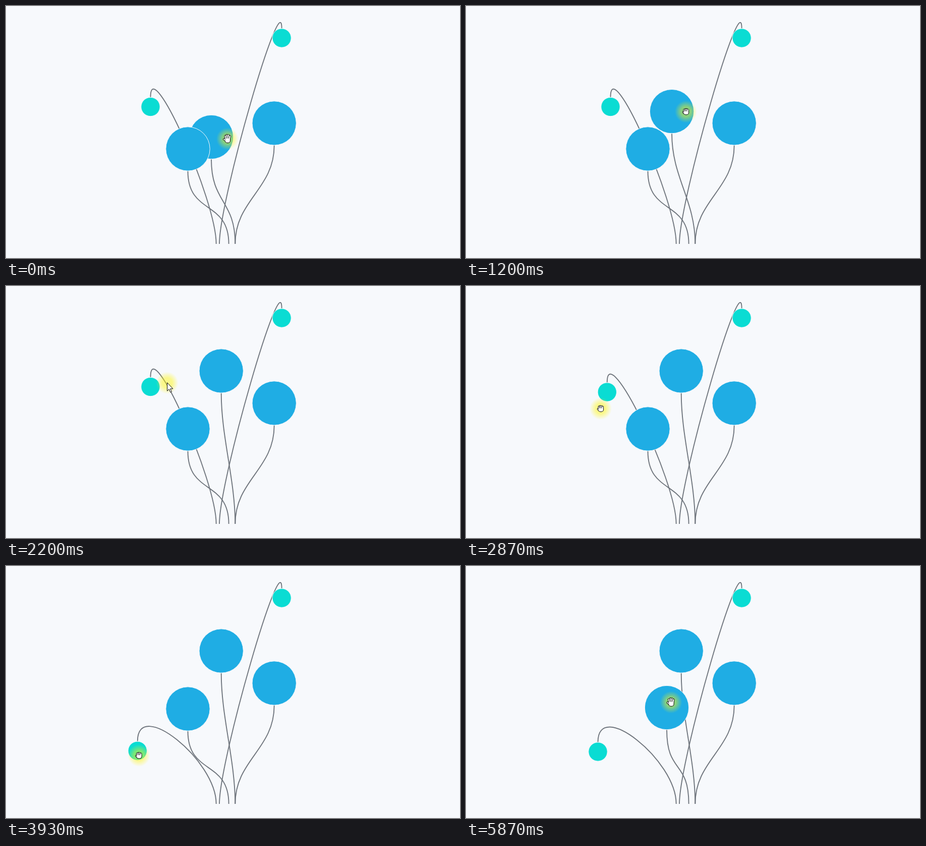
These frames come from a looping animation (900 px wide and 500 px high, 6.07 s). An HTML page with a canvas:

```html
<!DOCTYPE html>
<html lang="en">
<head>
<meta charset="utf-8">
<title>Draggable flowers</title>
<style>
  html, body { margin: 0; width: 100%; height: 100%; overflow: hidden; background: #f7f9fc; }
  canvas { display: block; width: 900px; height: 500px; }
</style>
</head>
<body>
<canvas id="stage" width="900" height="500"></canvas>
<script>
const ctx = document.getElementById('stage').getContext('2d');
const LOOP = 6070;
const BG = '#f7f9fc', BLUE = '#1fade4', TEAL = '#0adcd3', STEM = '#6f757d';
const GROUND = 472, BEND = 87;
const LAG = 65;      // a dragged flower trails the pointer by this much
const PRESS = 150;   // the hand closes this long before a drag moves
const GLOW = 22;

const mix = (a, b, u) => a + (b - a) * u;
const mixPoint = (p, q, u) => [mix(p[0], q[0], u), mix(p[1], q[1], u)];
const add = (p, q) => [p[0] + q[0], p[1] + q[1]];
const progress = (t, from, to) => Math.min(1, Math.max(0, (t - from) / (to - from)));
const smooth = u => u * u * (3 - 2 * u);
const fastSlowFast = u => 0.5 + 4 * (u - 0.5) ** 3;
const curve = (a, via, b, u) => mixPoint(mixPoint(a, via, u), mixPoint(via, b, u), u);

const bud = (base, home) => ({ base, home, r: 18.2, dir: -1, color: TEAL });
const ball = (base, home) => ({ base, home, r: 43.2, dir: 1, color: BLUE });

const highBud = bud(423, [546.6, 63.5]);
const lowBud = bud(416.7, [286.5, 200]);
const rightBall = ball(454.3, [531.7, 232.5]);
const midBall = ball(454.3, [407, 260]);
const leftBall = ball(441.6, [360.5, 283.5]);
const flowers = [highBud, lowBud, rightBall, midBall, leftBall];

// grip and drop: pointer offsets at both ends; approach bends the way to the flower
const drags = [
  { flower: midBall, via: [401, 195], to: [426.7, 168.5], ease: smooth,
    reach: 0, start: 640, end: 1840, release: 1880,
    grip: [32, 3.5], drop: [21.5, 12] },
  { flower: lowBud, via: [226, 290], to: [261.5, 368.5], ease: fastSlowFast,
    reach: 2330, start: 2849, end: 3935, release: 4200,
    grip: [1, 7], drop: [2, 7.5], approach: [368, 164] },
  { flower: leftBall, via: [382, 281], to: [398, 281], ease: smooth,
    reach: 4720, start: 5140, end: 5540, release: 5865,
    grip: [10.5, -9], drop: [8.5, -10.7], approach: [310, 310] }
];
for (const d of drags) d.flower.drag = d;

const dragged = (d, t) => d.ease(progress(t, d.start, d.end));

function spot(f, t) {
  return f.drag ? curve(f.home, f.drag.via, f.drag.to, dragged(f.drag, t)) : f.home;
}

function pointer(t) {
  const i = drags.findLastIndex(d => t >= d.reach);
  const d = drags[i], next = drags[i + 1];
  if (next && t > d.release) {
    const u = smooth(progress(t, d.release, next.reach));
    return curve(add(d.to, d.drop), next.approach, add(next.flower.home, next.grip), u);
  }
  const ahead = t + LAG;
  return add(spot(d.flower, ahead), mixPoint(d.grip, d.drop, dragged(d, ahead)));
}

function drawStem(f, [x, y]) {
  const top = y + f.dir * (f.r + 1);
  ctx.beginPath();
  ctx.moveTo(x, top);
  ctx.bezierCurveTo(x, top + f.dir * BEND, f.base, GROUND - BEND, f.base, GROUND);
  ctx.strokeStyle = STEM;
  ctx.lineWidth = 1.9;
  ctx.stroke();
}

function drawBloom(f, [x, y]) {
  ctx.beginPath();
  ctx.arc(x, y, f.r + 0.5, 0, Math.PI * 2);
  ctx.fillStyle = f.color;
  ctx.fill();
  ctx.strokeStyle = BG;
  ctx.lineWidth = 1;
  ctx.stroke();
}

function drawGlow(x, y) {
  const g = ctx.createRadialGradient(x, y, GLOW * 0.45, x, y, GLOW);
  g.addColorStop(0, 'rgba(255,246,10,0.47)');
  g.addColorStop(1, 'rgba(255,246,10,0)');
  ctx.fillStyle = g;
  ctx.fillRect(x - GLOW, y - GLOW, GLOW * 2, GLOW * 2);
}

function outline(width) {
  ctx.strokeStyle = '#000';
  ctx.lineWidth = width;
  ctx.stroke();
}

function drawArrow() {
  ctx.fillStyle = '#fff';
  ctx.fill(arrow);
  ctx.strokeStyle = '#000';
  ctx.lineWidth = 1;
  ctx.stroke(arrow);
}
const arrow = new Path2D('M0 0V16L3.7 12.6L6.3 18.6L8.8 17.5L6.2 11.7H11Z');

function drawFinger(x1, y1, x2, y2) {
  ctx.beginPath();
  ctx.moveTo(x1, y1);
  ctx.lineTo(x2, y2);
  outline(4.2);
  ctx.strokeStyle = '#fff';
  ctx.lineWidth = 2.4;
  ctx.stroke();
}

function drawHand({ spread, reach, arch, depth }) {
  const palm = () => {
    ctx.beginPath();
    ctx.roundRect(-4.3, -0.8, 9.4, depth + 0.8, [1, 1, 4, 4]);
  };
  palm();
  outline(2);
  drawFinger(-3, 3, -4.6 - 2.4 * spread, 1);
  for (let i = 0; i < 4; i++) {
    const x = -3 + 2.2 * i;
    drawFinger(x, 1, x + (i - 1.5) * spread, -reach + arch * (i - 1.4) ** 2);
  }
  palm();
  ctx.fillStyle = '#fff';
  ctx.fill();
}
const OPEN = { spread: 0.9, reach: 7.3, arch: 0.9, depth: 7.4 };
const CLOSED = { spread: 0.2, reach: 4.7, arch: 0.5, depth: 5.6 };

function drawPointer(t) {
  const [x, y] = pointer(t);
  const holding = drags.some(d => t >= d.start - PRESS && t < d.release);
  const hovering = flowers.some(f => {
    const [fx, fy] = spot(f, t);
    return Math.hypot(fx - x, fy - y) < f.r;
  });
  drawGlow(x, y);
  ctx.save();
  ctx.translate(x, y);
  ctx.lineCap = ctx.lineJoin = 'round';
  if (holding) drawHand(CLOSED);
  else if (hovering) drawHand(OPEN);
  else drawArrow();
  ctx.restore();
}

function draw(t) {
  ctx.fillStyle = BG;
  ctx.fillRect(0, 0, 900, 500);
  for (const f of flowers) drawStem(f, spot(f, t));
  for (const f of flowers) drawBloom(f, spot(f, t));
  drawPointer(t);
}

const start = performance.now();
function tick() {
  draw((performance.now() - start) % LOOP);
  requestAnimationFrame(tick);
}
tick();
</script>
</body>
</html>
```
